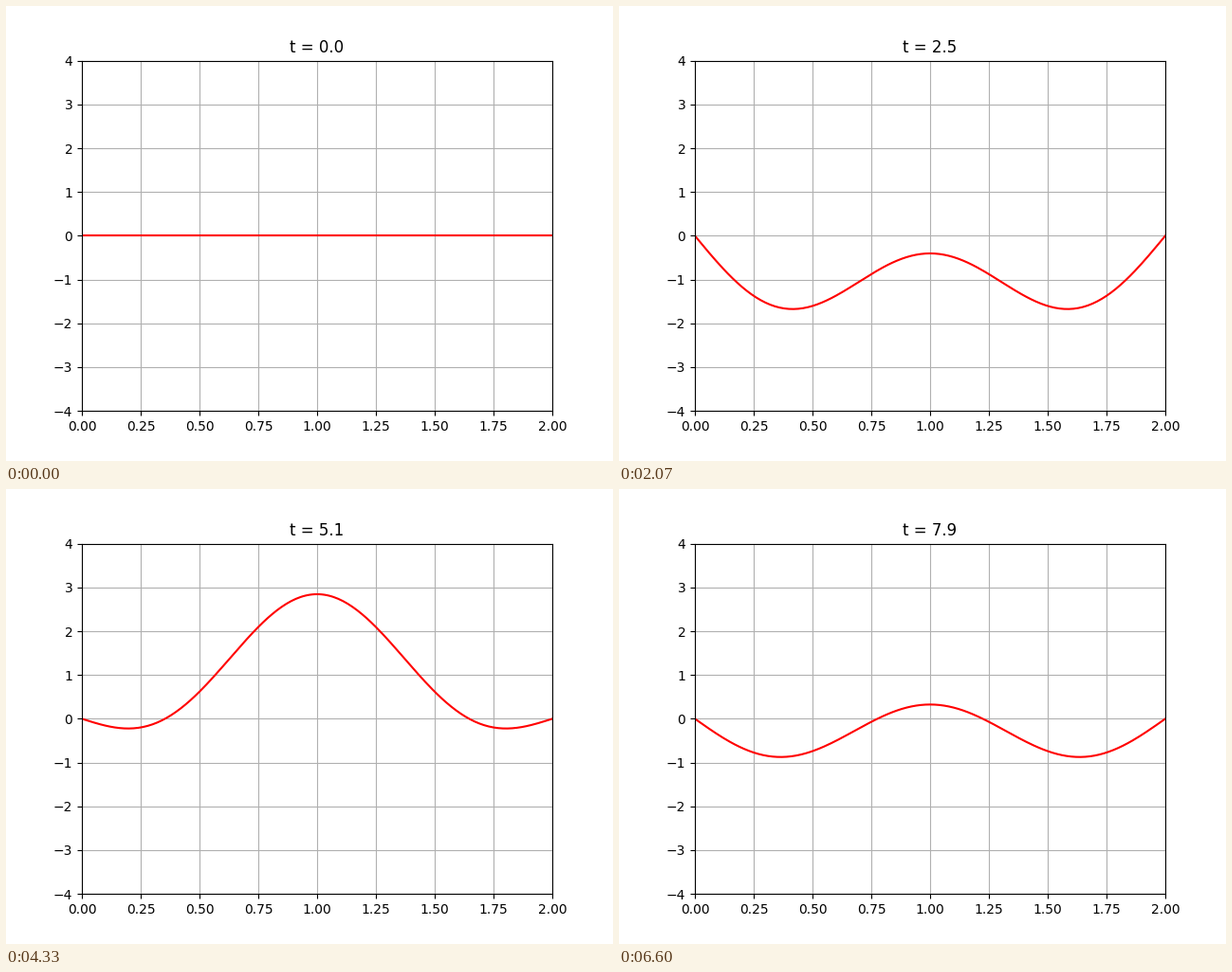
Recreate the animation shown at these times as a matplotlib script. Size 640 by 480 pixels, loop 6.67 s.

```python
import matplotlib.pyplot as plt
import numpy as np
from matplotlib.animation import FuncAnimation

FRAMES = 100
LOOP_MS = 6670

x = np.linspace(0, 2, 201)
times = np.linspace(0, 8, 2 * FRAMES)[::2]


def mode(n, speed, t):
    """Standing wave n on a string of length 2, started with the given speed."""
    w = n * np.pi / 2
    return speed / w * np.sin(w * t) * np.sin(w * x)


def displacement(t):
    return mode(1, 3, t) + mode(3, 6, t)


plt.rcParams["font.family"] = "DejaVu Sans"
fig, ax = plt.subplots(figsize=(6.4, 4.8), dpi=100)
ax.set_xlim(0, 2)
ax.set_ylim(-4, 4)
ax.grid(True)
line, = ax.plot(x, displacement(0), color="red", lw=1.5)
title = ax.set_title("t = 0.0")


def update(i):
    t = times[i]
    line.set_ydata(displacement(t))
    title.set_text(f"t = {t:.1f}")
    return line, title


anim = FuncAnimation(fig, update, frames=FRAMES, interval=LOOP_MS / FRAMES,
                     repeat=True, repeat_delay=0, blit=False)
plt.show()
```
